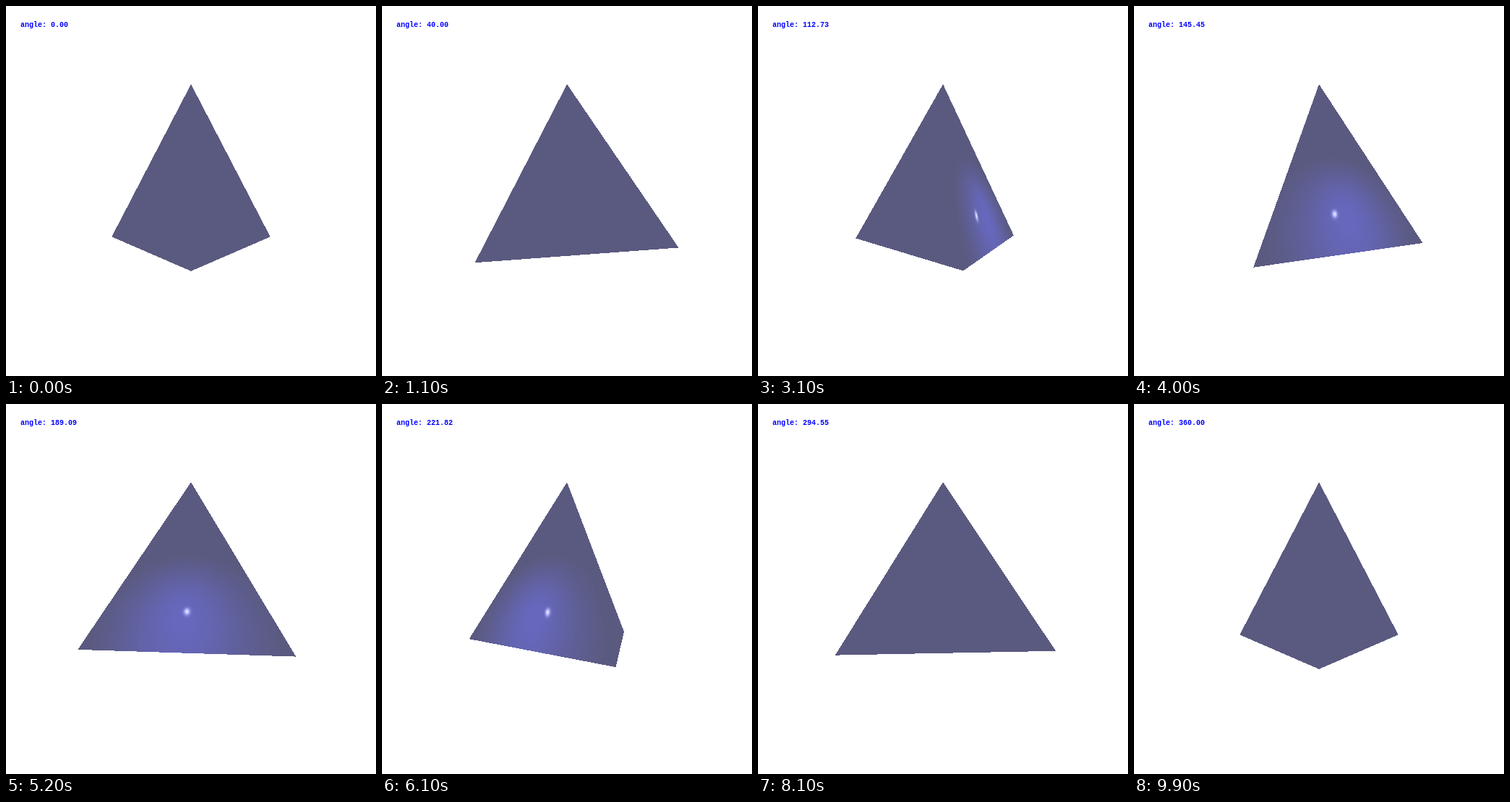
Recreate the animation shown at these times as an HTML page with a canvas. Size 512x512 px, loop 10000 ms.

```html
<!DOCTYPE html>
<html lang="en">
<head>
<meta charset="utf-8">
<title>Rotating tetrahedron</title>
<style>
  html, body { margin: 0; width: 100%; height: 100%; overflow: hidden; background: #fff; }
  canvas { display: block; }
</style>
</head>
<body>
<canvas id="stage" width="512" height="512"></canvas>
<script>
const ctx = document.getElementById('stage').getContext('2d');
const SIZE = 512, MID = SIZE / 2, STEPS = 100, STEP_MS = 100;
const FOCAL = MID / Math.tan(Math.PI / 6); // 60 degree field of view
const DISTANCE = 3;
const HALF_BASE = Math.sqrt(3) / 2;
const LIGHT = [0, -0.54, 1.67];
const AMBIENT = [90, 90, 128], DIFFUSE = [13, 13, 62], SPECULAR = [125, 125, 115];
const SHININESS = 100;

const dot = (a, b) => a[0] * b[0] + a[1] * b[1] + a[2] * b[2];
const unit = v => { const len = Math.hypot(...v); return v.map(c => c / len); };
const sub = (a, b) => a.map((c, i) => c - b[i]);

// Phong shading with a normal blended between the corners of the face.
function shade(p, t, eye) {
  const normal = unit([p[0] * 0.949, 1 - 1.316 * t, 0.4745 * t]);
  const toLight = unit(sub(LIGHT, p));
  const toEye = unit(sub(eye, p));
  const lit = dot(normal, toLight);
  if (lit <= 0) return AMBIENT;
  const mirrored = 2 * lit * dot(normal, toEye) - dot(toLight, toEye);
  const gloss = Math.max(0, mirrored) ** SHININESS;
  return AMBIENT.map((c, i) => c + DIFFUSE[i] * lit + SPECULAR[i] * gloss);
}

// Face coordinates: u along the base edge, y up, n outwards from the axis.
function drawFace(image, turn, lit) {
  const sin = Math.sin(turn), cos = Math.cos(turn);
  const eye = [-DISTANCE * sin, 0, DISTANCE * cos];
  if (3 * eye[2] <= 1) return;
  for (let py = 105; py < 370; py++) {
    for (let px = 95; px < 417; px++) {
      const x = (px + 0.5 - MID) / FOCAL, dy = (MID - py - 0.5) / FOCAL;
      const du = x * cos + sin, dn = x * sin - cos;
      const s = (1 - 3 * eye[2]) / (3 * dn + dy);
      if (s <= 0) continue;
      const p = [eye[0] + s * du, s * dy, eye[2] + s * dn];
      const t = (1 - p[1]) / 1.5;
      if (t < 0 || t > 1 || Math.abs(p[0]) > HALF_BASE * t) continue;
      image.data.set(lit ? shade(p, t, eye) : AMBIENT, (py * SIZE + px) * 4);
    }
  }
}

function draw(step) {
  const angle = step * 360 / (STEPS - 1);
  const image = ctx.createImageData(SIZE, SIZE);
  image.data.fill(255);
  for (let k = 0; k < 3; k++) {
    drawFace(image, (180 - angle + 120 * k) * Math.PI / 180, k === 0);
  }
  ctx.putImageData(image, 0, 0);
  ctx.fillStyle = '#00f';
  ctx.font = 'bold 10px "Liberation Mono", monospace';
  ctx.fillText('angle: ' + angle.toFixed(2), 20, 29);
}

const start = performance.now();
let shown = -1;
function tick() {
  const step = Math.floor((performance.now() - start) / STEP_MS) % STEPS;
  if (step !== shown) draw(shown = step);
  requestAnimationFrame(tick);
}
tick();
</script>
</body>
</html>
```
